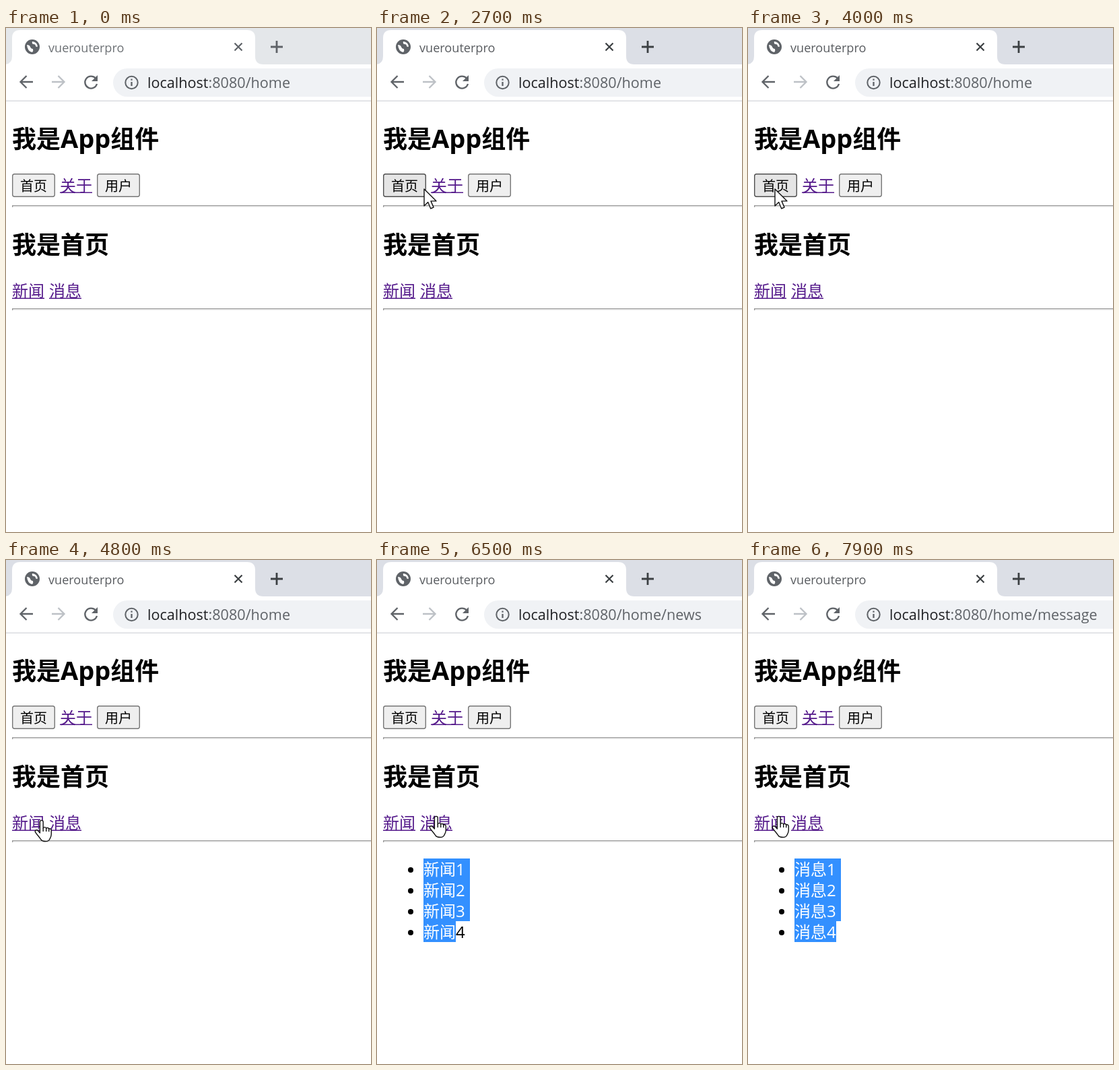
An HTML page that plays this animation: 542x748 px, repeating every 8000 ms.

```html
<!DOCTYPE html>
<html lang="zh-CN">
<head>
<meta charset="utf-8">
<title>vuerouterpro</title>
<style>
  html, body { margin: 0; width: 100%; height: 100%; overflow: hidden; background: #fff; }
  svg { display: block; width: 542px; height: 748px; }
  text { font: 24px "Open Sans", "Noto Sans CJK SC", "Noto Sans CJK", sans-serif; white-space: pre; }
  .h2 { font-size: 36px; font-weight: 700; }
  .btn { font-size: 20px; }
  .button rect { fill: #efefef; stroke: #767676; stroke-width: 1.4; }
  .button.hover rect { fill: #e5e5e5; stroke: #4f4f4f; }
  .button.down rect { fill: #f5f5f5; stroke: #8d8d8d; }
  .link { fill: #551a8b; }
  .link.down { fill: #f00; }
  .line { fill: none; stroke: #5f6368; stroke-width: 2.3; }
  #title { font-size: 18.1px; fill: #6d7175; }
  #url { font-size: 21.6px; fill: #5f6368; }
  #strip { fill: #e4e7ea; }
  #tools { stroke: #5f6368; fill: none; }
  .focused #strip { fill: #dcdfe6; }
  .focused #tools { stroke: #3c4043; }
  .focused #title { fill: #585b5f; }
  #beam { mix-blend-mode: difference; }
  #arrow, #hand { fill: #fff; stroke: #111; stroke-width: 1.4; stroke-linejoin: round; }
</style>
</head>
<body>
<svg id="stage" viewBox="0 0 542 748">
  <defs>
    <g id="hr">
      <path d="M9 0H542V1.5H10.5V3H9z" fill="#9a9a9a"/>
      <path d="M10.5 1.5H542V3H10.5z" fill="#eee"/>
    </g>
  </defs>
  <rect width="542" height="748" fill="#fff"/>

  <rect id="strip" width="542" height="54"/>
  <path d="M-3 54Q9 54 9 42V15Q9 3 21 3H358Q370 3 370 15V42Q370 54 382 54z" fill="#fff"/>
  <circle cx="39" cy="28" r="11" fill="#5f6368"/>
  <path d="M31 25q4 0 5 3t4 3q1 3-1 5-7-1-8-11zM39 20q-1 4 2 4t3 3q2 2 3 0-1-6-8-7z" fill="#fff"/>
  <text id="title" x="63" y="35.5">vuerouterpro</text>
  <g id="tools">
    <path d="M339.5 22.5l11 11m0-11l-11 11" stroke-width="2.2"/>
    <path d="M393 28h18m-9-9v18" stroke-width="2.8"/>
  </g>

  <path class="line" d="M40 80H22M30.5 71L21.5 80l9 9"/>
  <path class="line" d="M68 80H86M77.500 71l9 9-9 9" style="stroke:#bdc1c6"/>
  <path class="line" d="M133 74.500A9 9 0 1 0 135 83"/>
  <path d="M136 70v9h-9z" fill="#5f6368"/>
  <rect x="159" y="60" width="420" height="42" rx="21" fill="#f0f2f5"/>
  <circle class="line" cx="186.500" cy="81" r="9.200" style="stroke-width:2"/>
  <path class="line" d="M186.500 80v6m0-10.500v2.300"/>
  <text id="url" x="210" y="89"><tspan fill="#202124">localhost</tspan>:8080<tspan id="path"></tspan></text>
  <rect y="107.500" width="542" height="1.500" fill="#dadce0"/>

  <text class="h2" x="9" y="178">我是<tspan font-size="38">App</tspan>组件</text>
  <g class="button" id="homeBtn">
    <rect x="9.700" y="216.700" width="62.600" height="33.600" rx="3"/>
    <text class="btn" x="21" y="241.500">首页</text>
  </g>
  <g class="link" id="aboutLink">
    <text x="80" y="242.500">关于</text>
    <rect x="80" y="243.500" width="48" height="1.500"/>
  </g>
  <g class="button" id="userBtn">
    <rect x="135.700" y="216.700" width="62.600" height="33.600" rx="3"/>
    <text class="btn" x="147" y="241.500">用户</text>
  </g>
  <use href="#hr" y="263"/>

  <g id="homePage">
    <text class="h2" x="9" y="335">我是首页</text>
    <g class="link" id="newsLink">
      <text x="9" y="399">新闻</text>
      <rect x="9" y="400.500" width="48" height="1.500"/>
    </g>
    <g class="link" id="msgLink">
      <text x="64" y="399">消息</text>
      <rect x="64" y="400.500" width="48" height="1.500"/>
    </g>
    <use href="#hr" y="416"/>
  </g>
  <g id="aboutPage">
    <text class="h2" x="9" y="335">我是关于</text>
  </g>
  <g id="userPage">
    <text class="h2" x="9" y="335">我是<tspan font-size="35">user</tspan>界面</text>
    <text x="9" y="398">欢迎你：<tspan font-size="24.500">qinghuan</tspan></text>
  </g>
  <g id="list"></g>

  <g id="arrow"><path d="M0 0V25l5.700-5.400 4 9.400 4.300-1.900-4-9.200h8z"/></g>
  <g id="hand">
    <path d="M-2.600 19V2.800a2.400 2.400 0 0 1 4.800 0V12c.5-2 4.300-1.800 4.500.4.8-1.600 3.800-1.200 4 .9 1-1.200 3.600-.6 3.600 2V21c0 3.500-1.600 5.500-2.600 7.500-1.200 2.600-3 3-5.700 3-3 0-5.500-.2-7-2.500-2-3.500-5.800-7-8.300-10.900-1.500-2.600 1.600-4.400 3.800-2.400z"/>
    <path d="M2.200 12v5M6.700 12.400v4.600M10.700 13.300v4" fill="none"/>
  </g>
  <path id="beam" d="M-1-12h5m2 0h5M5-11V11M-1 12h5m2 0h5" fill="none" stroke="#fff" stroke-width="2"/>
</svg>
<script>
const LOOP = 8000, STEP = 100;
const $ = id => document.getElementById(id);

// [start, route]
const routes = [[0, "/home"], [1800, "/about"], [2600, "/home"], [3200, "/user/qinghuan"],
  [4000, "/home"], [5000, "/home/news"], [6700, "/home/message"]];

// [time, x, y] of the pointer's hot spot
const track = [[400, 1, 251], [700, 16, 246], [1000, 42, 244], [1200, 64, 250], [1600, 121, 237],
  [2000, 121, 237], [2400, 42, 238], [2600, 40, 239], [3000, 160, 238], [3200, 165, 238],
  [3400, 122, 237], [3500, 121, 237], [3600, 112, 238], [3800, 44, 239], [3900, 40, 239],
  [4100, 40, 239], [4600, 54, 384], [4800, 53, 386], [5000, 53, 386], [5500, 117, 573],
  [5600, 117, 573], [5700, 104, 533], [5800, 80, 497], [6000, 72, 456], [6100, 72, 455],
  [6500, 88, 380], [6700, 88, 380], [7000, 131, 563], [7200, 102, 497], [7400, 78, 480],
  [7600, 72, 456], [7900, 46, 380]];

// [id, x0, y0, x1, y1]
const links = [["aboutLink", 80, 218, 128, 249], ["newsLink", 9, 374, 57, 405], ["msgLink", 64, 374, 112, 405]];
const buttons = [["homeBtn", 9, 216, 73, 251], ["userBtn", 135, 216, 199, 251]];
const presses = { aboutLink: [1700], homeBtn: [2500, 3900], userBtn: [3100], newsLink: [4900], msgLink: [6600] };
const drags = [{ from: 5700, to: 6100, until: 6600, col: 2 }, { from: 7000, to: 7600, until: LOOP, col: 3 }];

const edges = [69, 93, 117, 131], TOP = 443, ROW = 31;
const rows = [0, 1, 2, 3].map(i => {
  const g = document.createElementNS("http://www.w3.org/2000/svg", "g");
  g.innerHTML = `<rect y="${TOP + i * ROW}" height="${ROW}" fill="#3390ff"/>
    <circle cx="50" cy="${460 + i * ROW}" r="4"/>
    <text x="69" y="${468 + i * ROW}"><tspan></tspan><tspan></tspan><tspan>${i + 1}</tspan></text>`;
  $("list").append(g);
  return { mark: g.querySelector("rect"), chars: [...g.querySelectorAll("tspan")] };
});

const show = (id, on) => { $(id).style.display = on ? "" : "none"; };
const inside = ([x, y], x0, y0, x1, y1) => x >= x0 && x < x1 && y >= y0 && y < y1;

function pointer(t) {
  const i = track.findIndex(k => k[0] >= t);
  if (i < 0) return track[track.length - 1].slice(1);
  if (i === 0) return track[0].slice(1);
  const [t0, x0, y0] = track[i - 1], [t1, x1, y1] = track[i];
  const p = (t - t0) / (t1 - t0);
  return [x0 + (x1 - x0) * p, y0 + (y1 - y0) * p];
}

function drawList(word, t) {
  const drag = drags.find(d => t >= d.from && t < d.until);
  let row = 9, col = 0;
  if (drag) {
    const [x, y] = pointer(Math.min(t, drag.to));
    row = Math.max(0, Math.min(3, Math.floor((y - TOP) / ROW)));
    col = [81, 105, 124].filter(mid => x >= mid).length;
  }
  rows.forEach(({ mark, chars }, i) => {
    const start = i === row ? col : i > row ? 0 : 3;
    const end = i === 3 && drag ? drag.col : 3;
    const right = edges[end] + (i < 3 && i >= row ? 7 : 0);
    mark.setAttribute("x", edges[start]);
    mark.setAttribute("width", Math.max(0, right - edges[start]));
    chars[0].textContent = word[0];
    chars[1].textContent = word[1];
    chars.forEach((c, n) => c.setAttribute("fill", n >= start && n < end ? "#fff" : "#000"));
  });
}

function draw(t) {
  const route = routes.filter(r => r[0] <= t).pop()[1];
  const home = route.startsWith("/home"), listed = route.length > 5 && home;
  const pos = pointer(t);
  $("stage").classList.toggle("focused", t >= 1800);
  $("path").textContent = route;
  show("homePage", home);
  show("aboutPage", route === "/about");
  show("userPage", route.startsWith("/user"));
  show("list", listed);
  if (listed) drawList(route.endsWith("news") ? "新闻" : "消息", t);

  const visible = t >= 400;
  for (const [id, ...box] of [...buttons, ...links]) {
    $(id).classList.toggle("hover", visible && inside(pos, ...box));
    $(id).classList.toggle("down", presses[id].includes(t));
  }

  const dragging = drags.some(d => t >= d.from && t < d.to);
  const onLink = links.some(([id, ...box]) => (home || id === "aboutLink") && inside(pos, ...box));
  const onText = inside(pos, 9, 297, 153, 345) || listed && inside(pos, 69, TOP, 138, 575);
  const kind = dragging ? "beam" : onLink ? "hand" : onText ? "beam" : "arrow";
  for (const id of ["arrow", "hand", "beam"]) {
    show(id, visible && id === kind);
    $(id).setAttribute("transform", `translate(${Math.round(pos[0])} ${Math.round(pos[1])})`);
  }
}

function tick() {
  draw(Math.floor(performance.now() % LOOP / STEP) * STEP);
  requestAnimationFrame(tick);
}
tick();
</script>
</body>
</html>
```
